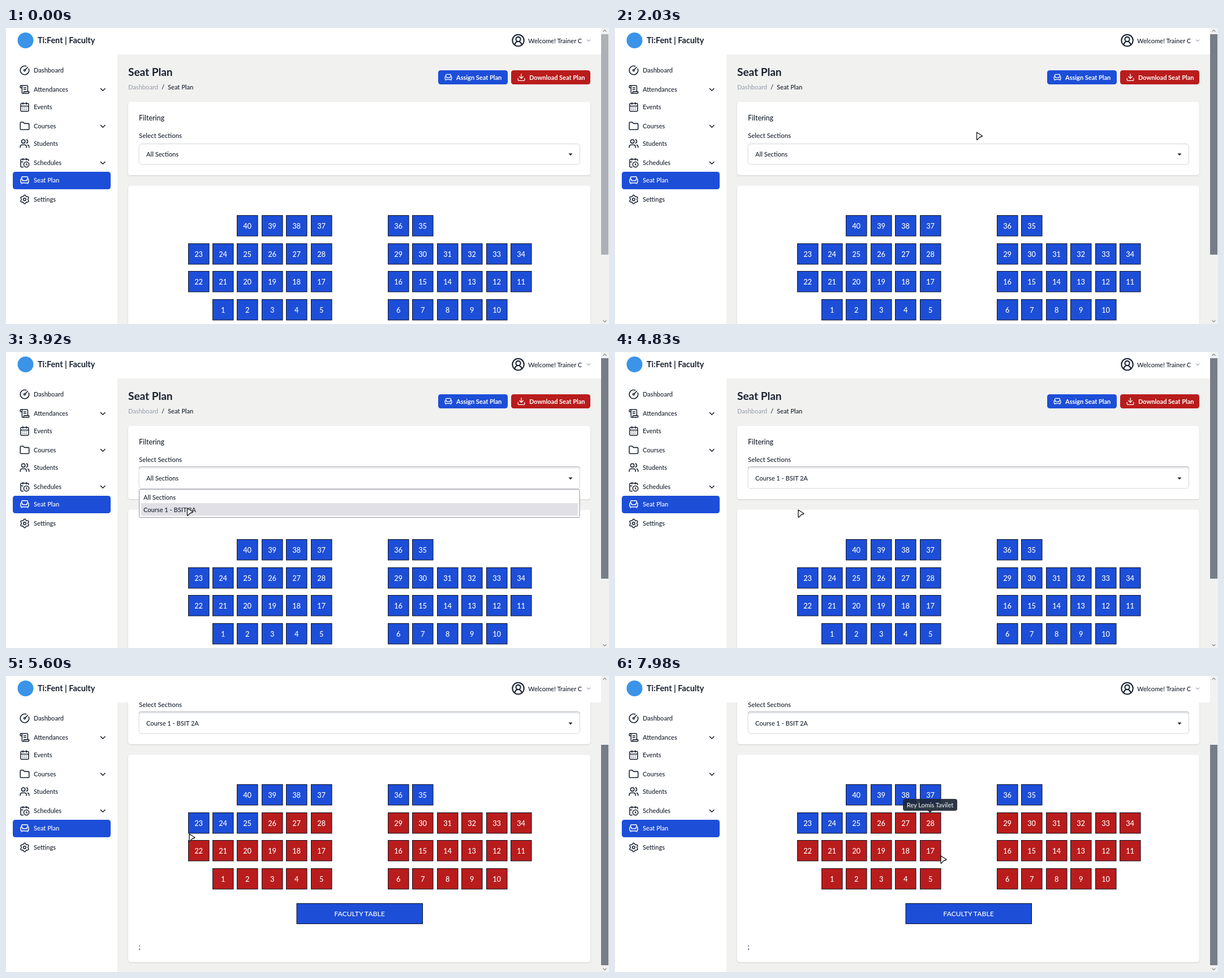
Write an HTML page that moves like this. It is 1066 px wide and 525 px high and loops after 8 s.

```html
<!DOCTYPE html>
<html lang="en">
<head>
<meta charset="utf-8">
<title>Seat Plan</title>
<style>
  html, body { margin: 0; width: 100%; height: 100%; overflow: hidden; background: #fff; }
  svg { display: block; font-family: Lato, "Open Sans", sans-serif; font-weight: 500; }
  .icon { fill: none; stroke-width: 2; stroke-linecap: round; stroke-linejoin: round; }
  .card { fill: #fff; filter: drop-shadow(0 1px 1.2px #0002); }
</style>
</head>
<body>
<script>
const INK = '#18212f', BLUE = '#1d4ed8', RED = '#b91c1c';
const LOOP = 8000, STEP = 70;

const rect = (x, y, w, h, fill, more = '') =>
  `<rect x="${x}" y="${y}" width="${w}" height="${h}" fill="${fill}" ${more}/>`;
const text = (x, y, s, size = 11.1, fill = INK, more = '') =>
  `<text x="${x}" y="${y}" font-size="${size}" fill="${fill}" ${more}>${s}</text>`;
const ring = (x, y, r) => `M${x - r} ${y}a${r} ${r} 0 1 0 ${2 * r} 0a${r} ${r} 0 1 0 ${-2 * r} 0`;
const line = (d, color, width = 1, more = '') =>
  `<path d="${d}" fill="none" stroke="${color}" stroke-width="${width}" ${more}/>`;
const BOLD = 'font-weight="700"', MID = 'text-anchor="middle"';

// Icons live on a 24 unit grid
const gear = 'M' + Array.from({ length: 72 }, (_, i) => {
  const a = i * Math.PI / 36, r = 8.7 + 1.3 * Math.cos(6 * a);
  return (12 + r * Math.sin(a)).toFixed(2) + ' ' + (12 - r * Math.cos(a)).toFixed(2);
}).join('L') + 'Z';
const icons = {
  gauge: 'M15.6 2.7a10 10 0 1 0 5.7 5.7M13.4 10.6 19 5' + ring(12, 12, 2),
  scroll: 'M15 12h-5M15 8h-5M19 17V5a2 2 0 0 0-2-2H4M8 21h12a2 2 0 0 0 2-2v-1a1 1 0 0 0-1-1H11a1 1 0 0 0-1 1v1a2 2 0 1 1-4 0V5a2 2 0 1 0-4 0v2a1 1 0 0 0 1 1h3',
  calendar: 'M5 4h14a2 2 0 0 1 2 2v14a2 2 0 0 1-2 2H5a2 2 0 0 1-2-2V6a2 2 0 0 1 2-2M8 2v4M16 2v4M3 10h18M8 14h.01M12 14h.01M16 14h.01M8 18h.01M12 18h.01M16 18h.01',
  folder: 'M20 20a2 2 0 0 0 2-2V8a2 2 0 0 0-2-2h-7.9a2 2 0 0 1-1.7-.9L9.6 3.9A2 2 0 0 0 7.9 3H4a2 2 0 0 0-2 2v13a2 2 0 0 0 2 2Z',
  users: 'M16 21v-2a4 4 0 0 0-4-4H6a4 4 0 0 0-4 4v2M22 21v-2a4 4 0 0 0-3-3.9M16 3.1a4 4 0 0 1 0 7.8' + ring(9, 7, 4),
  clock: 'M21 7.5V6a2 2 0 0 0-2-2H5a2 2 0 0 0-2 2v14a2 2 0 0 0 2 2h3.5M16 2v4M8 2v4M3 10h5M17.5 17.5 16 16.3V14' + ring(16, 16, 6),
  chair: 'M19 9V6a2 2 0 0 0-2-2H7a2 2 0 0 0-2 2v3M3 16a2 2 0 0 0 2 2h14a2 2 0 0 0 2-2v-5a2 2 0 0 0-4 0v2H7v-2a2 2 0 0 0-4 0zM5 18v2M19 18v2',
  gear: gear + ring(12, 12, 3),
  user: 'M18 20a6 6 0 0 0-12 0' + ring(12, 10, 4) + ring(12, 12, 10),
  download: 'M21 15v4a2 2 0 0 1-2 2H5a2 2 0 0 1-2-2v-4M7 10l5 5 5-5M12 15V3',
};
const icon = (name, cx, cy, size = 18.6, color = INK) =>
  `<path class="icon" d="${icons[name]}" stroke="${color}"
    transform="translate(${cx - size / 2} ${cy - size / 2}) scale(${size / 24})"/>`;

const menu = [
  ['Dashboard', 'gauge', 75], ['Attendances', 'scroll', 109, 1], ['Events', 'calendar', 140],
  ['Courses', 'folder', 174, 1], ['Students', 'users', 205], ['Schedules', 'clock', 239, 1],
  ['Seat Plan', 'chair', 270], ['Settings', 'gear', 304],
];
const sidebar = rect(12, 255, 173, 31, BLUE, 'rx="4.5"') + menu.map(([label, name, y, open]) => {
  const color = label === 'Seat Plan' ? '#fff' : INK;
  return icon(name, 33, y, 18.6, color) + text(49, y + 4, label, 11.1, color) +
    (open ? line(`M167 ${y - 2}l4.2 4.2 4.2-4.2`, INK, 1.6) : '');
}).join('');

const header = rect(0, 0, 1052, 47, '#fff') +
  '<circle cx="34.5" cy="22" r="14" fill="#3b94e8"/>' +
  text(56, 27, 'Ti:Fent | Faculty', 14.4, INK, BOLD) +
  icon('user', 905.5, 22, 24.5) + text(923, 26.5, 'Welcome! Trainer C') +
  line('M1027 20.5l3 3 3-3', '#6b7280');

// Seat runs: first number, last number, left edge, row
const runs = [
  [40, 37, 408.4, 0], [36, 35, 675, 0], [23, 28, 321.5, 1], [29, 34, 675, 1],
  [22, 17, 321.5, 2], [16, 11, 675, 2], [1, 5, 365, 2.999], [6, 10, 675, 2.999],
];
const taken = n => n <= 22 || (n >= 26 && n <= 34);
const seats = runs.map(([from, to, left, row]) => {
  const dir = Math.sign(to - from), y = Math.round(332 + row * 49.6);
  let out = '';
  for (let n = from, i = 0; i <= Math.abs(to - from); n += dir, i++) {
    const x = Math.round(left + i * 43.4);
    out += rect(x + .5, y + .5, 36.5, 36.5, BLUE, `stroke="#0b1020" ${taken(n) ? 'class="taken"' : ''}`) +
      text(x + 18.6, y + 23.5, n, 12.8, '#fff', MID);
  }
  return out;
}).join('');

const button = (x, w, name, label, fill) => rect(x, 75, w, 25, fill, 'rx="4.5"') +
  icon(name, x + 18, 87.5, 15.5, '#fff') + text(x + 32, 91.5, label, 11, '#fff', BOLD);

const page = text(216, 85, 'Seat Plan', 19, INK, BOLD) +
  text(216, 108.5, 'Dashboard', 11.1, '#9ca3af') + text(275, 108.5, '/') + text(286, 108.5, 'Seat Plan') +
  button(764, 123, 'chair', 'Assign Seat Plan', BLUE) +
  button(893, 140, 'download', 'Download Seat Plan', RED) +
  rect(216, 131, 817, 130, '#fff', 'class="card" rx="4.5"') +
  text(235, 163.5, 'Filtering', 12.4) + text(235, 194.5, 'Select Sections', 11.4) +
  line('M235 207q0-3.5 3.500-3.500h772.500q3.500 0 3.500 3.500', '#a9a9ad', 1, 'id="focus"') +
  rect(235, 205.5, 779.5, 36.5, '#fff', 'rx="5" stroke="#d1d5db"') +
  text(248, 228, '', 11.1, INK, 'id="choice"') +
  `<path d="M994.500 222.500h7l-3.500 3.700z" fill="${INK}"/>` +
  rect(216, 279.500, 817, 368, '#fff', 'class="card" rx="4.5"') + seats +
  rect(514, 543.500, 222.500, 36, BLUE, 'stroke="#0b1020"') +
  text(625, 566, 'FACULTY TABLE', 12.2, '#fff', MID) + text(234.500, 625, ';', 12.4);

const list = '<g id="list">' + rect(235.5, 243.5, 778.5, 50, '#fff', 'rx="2" stroke="#8f8f9d"') +
  rect(239, 268, 772, 22.5, '#e0e0e6', 'id="hover"') +
  text(243, 262, 'All Sections') + text(243, 284, 'Course 1 - BSIT 2A') + '</g>';

// Tooltips: name, seat centre, width, shown from, shown until
const tips = [
  ['Ian Dolor Santavela', 470, 106, 6160, 6720],
  ['Joel Damaso Ventorin', 513.5, 119, 6720, 7350],
  ['Rey Lomis Tavilet', 557, 96, 7350, 8200],
];
const tooltips = tips.map(([name, x, w]) => `<g class="tip">` +
  rect(x - w / 2, 218, w, 21, '#1f2937', 'rx="4" opacity=".93"') +
  `<path d="M${x - 4} 239h8l-4 3.500z" fill="#1f2937"/>` +
  text(x, 232.5, name, 11, '#e5e7eb', MID) + '</g>').join('');

const bar = rect(1052, 0, 14, 525, '#f1f1f1') + rect(1052, 11, 13, 391, '#adb0b5', 'id="thumb"') +
  line('M1055.500 6.500l3-3 3 3M1055.500 518.500l3 3 3-3', '#85888d', 1.2);
const pointer = '<path id="arrow" d="M2 2L12 8.500Q11 10 7.500 10.500L2.500 15.500Q2 15 2 14Z" fill="#fff" ' +
  'stroke="#222" stroke-width="1.4" stroke-linejoin="round"/>' +
  line('M-2.500-7q2.500 0 2.500 2v10q0 2-2.500 2M2.500-7q-2.500 0-2.500 2M0 5q0 2 2.500 2', '#343a40', 1.2, 'id="beam"');

document.body.innerHTML = `<svg width="1066" height="525" viewBox="0 0 1066 525">
  ${rect(197, 47, 855, 478, '#f1f1f0')}<g id="page">${page}</g>
  ${list}${tooltips}${header}${sidebar}${bar}${pointer}</svg>`;

const el = id => document.getElementById(id);
const show = (node, on) => node.setAttribute('visibility', on ? 'visible' : 'hidden');
const move = (node, x, y) => node.setAttribute('transform', `translate(${x} ${y})`);
const clamp = v => Math.max(0, Math.min(1, v));
const smooth = v => v * v * (3 - 2 * v);

// Keys are [time, x, y]; eased between neighbours
const path = [
  [910, 1062, 112], [1470, 637.5, 183], [2730, 637.5, 183], [2800, 648, 181], [3220, 493, 230],
  [3430, 493, 230], [3920, 318.5, 275], [4620, 318.5, 275], [4830, 322, 278], [5810, 322, 278],
  [5950, 492, 279], [6020, 492, 279], [6510, 469, 264], [6650, 469, 264], [7000, 512, 268],
  [7210, 512, 268], [7700, 547, 269], [7770, 547, 269], [7980, 574, 317],
];
const scrolls = [[5390, 0], [5460, 8], [5530, 85], [5600, 140]];

function at(keys, t, ease = v => v) {
  const next = keys.findIndex(k => k[0] > t);
  if (next === 0) return keys[0].slice(1);
  if (next < 0) return keys[keys.length - 1].slice(1);
  const a = keys[next - 1], b = keys[next], f = ease((t - a[0]) / (b[0] - a[0]));
  return a.slice(1).map((v, i) => v + (b[i + 1] - v) * f);
}

const taking = document.querySelectorAll('.taken'), tipNodes = document.querySelectorAll('.tip');

function draw(now) {
  const t = Math.floor(now % LOOP / STEP) * STEP;
  const [x, y] = at(path, t, smooth), [scroll] = at(scrolls, t);

  move(el('page'), 0, -scroll);
  el('thumb').setAttribute('y', 11 + scroll * 111 / 140);
  el('thumb').setAttribute('fill', t < 980 ? '#adb0b5' : '#777d86');

  show(el('focus'), t >= 3360);
  show(el('list'), t >= 3360 && t < 4270);
  el('hover').setAttribute('y', y > 264 ? 268 : 246.5);
  el('choice').textContent = t < 4270 ? 'All Sections' : 'Course 1 - BSIT 2A';
  taking.forEach(s => s.setAttribute('fill', t < 5040 ? BLUE : RED));

  tips.forEach(([, , , from, until], i) =>
    tipNodes[i].setAttribute('opacity', Math.min(clamp((t - from) / 210), clamp((until - t) / 140 + 1))));

  const overText = t > 6090 && tips.some(tip => Math.abs(x - tip[1]) < 9 && Math.abs(y - 260) < 9);
  show(el('arrow'), t >= 980 && !overText);
  show(el('beam'), overText);
  move(el('arrow'), x, y);
  move(el('beam'), x, y);
}

const start = performance.now();
(function frame() {
  draw(performance.now() - start);
  requestAnimationFrame(frame);
})();
</script>
</body>
</html>
```
